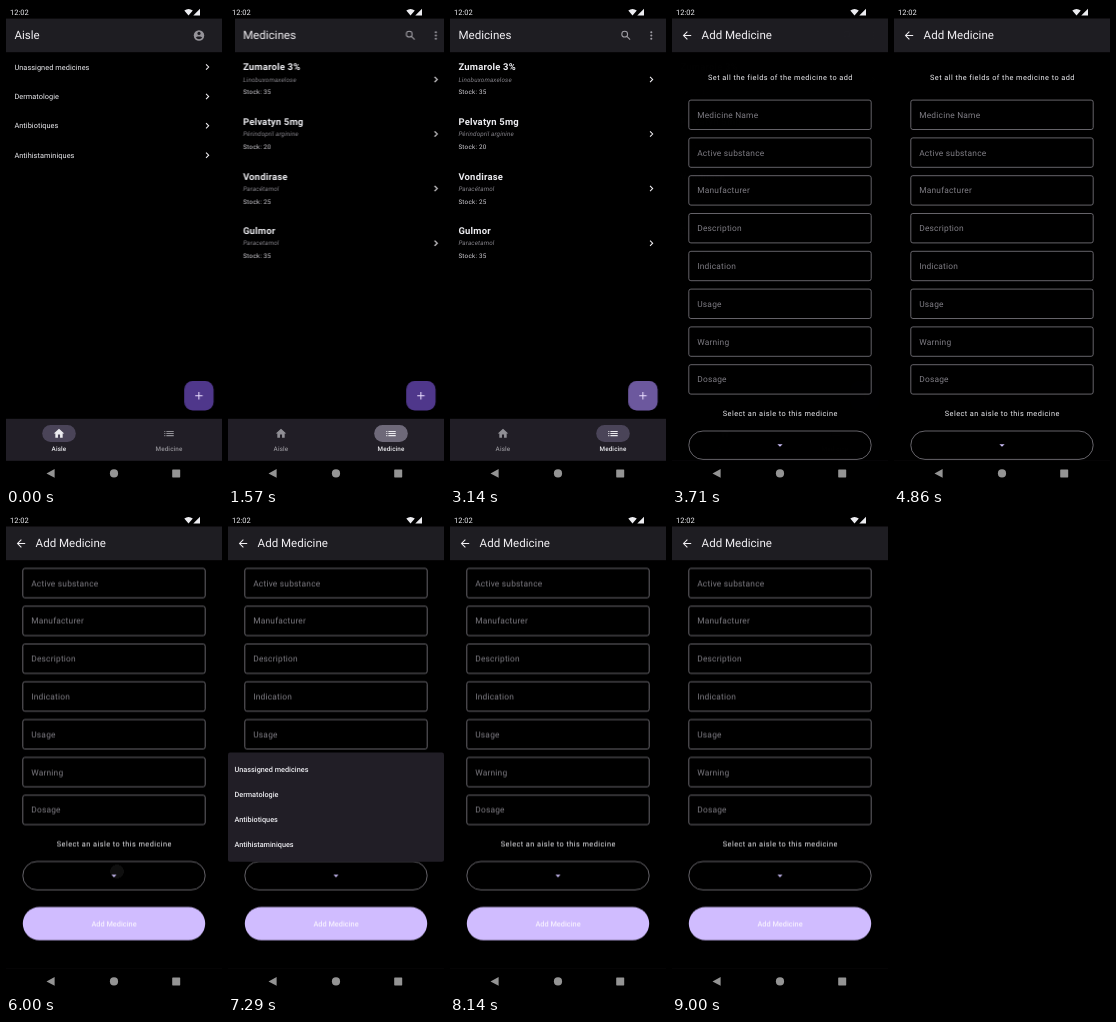
These frames come from a looping animation (216x480 px, 9140 ms). An HTML page:

```html
<!DOCTYPE html>
<html lang="en">
<head>
<meta charset="utf-8">
<title>Medicine stock app</title>
<style>
html, body { margin: 0; width: 100%; height: 100%; overflow: hidden; background: #000; }
svg { display: block; width: 100%; height: 100%; }
text { font-family: Roboto, "Open Sans", sans-serif; fill: #ececf0; white-space: pre; text-rendering: geometricPrecision; }
.title { font-size: 11.55px; fill: #f2f0f4; }
.row { font-size: 7.35px; letter-spacing: .06px; }
.name { font-size: 9.45px; font-weight: 700; letter-spacing: .22px; }
.substance { font-size: 6.3px; font-style: italic; letter-spacing: .14px; fill: #85838a; }
.stock { font-size: 6.3px; letter-spacing: .24px; fill: #d2d0d6; }
.tab text { font-size: 6.3px; font-weight: 500; letter-spacing: .15px; text-anchor: middle; }
.hint { font-size: 7.35px; letter-spacing: .44px; text-anchor: middle; }
.label { font-size: 8.4px; letter-spacing: .21px; fill: #7f7d84; }
.item { font-size: 7.3px; font-weight: 500; }
.action { font-size: 7.35px; font-weight: 500; text-anchor: middle; fill: #f8f2ff; }
.bar { fill: #1e1d22; }
.panel { fill: #211e26; }
.outline { fill: none; stroke: #716f75; stroke-width: .9; }
.pill { fill: #4a4458; }
.icon { fill: none; stroke: #a09ea5; stroke-width: 2; }
.solid { fill: #ececf0; stroke: none; }

.anim { animation: 9140ms linear infinite; transform-box: fill-box; transform-origin: center; }
.aisle-page { animation-name: aisle-page; }
.medicine-page { animation-name: medicine-page; }
.tab-off { animation-name: tab-off; }
.tab-on { animation-name: tab-on; }
.pill-off { animation-name: pill-off; }
.pill-on { animation-name: pill-on; }
.tab-ripple { animation-name: tab-ripple; }
.fab-ripple { animation-name: fab-ripple; }
.add-page { animation-name: add-page; }
.form { animation-name: scroll; }
.select-ripple { animation-name: select-ripple; }
.menu { animation-name: menu; transform-origin: 50% 100%; }

@keyframes aisle-page { 0%, 14.22% { opacity: 1 } 16.41%, 100% { opacity: 0 } }
@keyframes medicine-page {
  0%, 14.22% {
    transform: translateX(216px);
    animation-timing-function: linear(0, .264, .594, .8, .908, .96, .983, .993, 1);
  }
  18.6%, 100% { transform: none }
}
@keyframes tab-off { 0%, 14.11% { opacity: 1 } 15.21%, 100% { opacity: .55 } }
@keyframes tab-on { 0%, 14.11% { opacity: .55 } 15.21%, 100% { opacity: 1 } }
@keyframes pill-off {
  0%, 14.11% { transform: none; opacity: 1 }
  15.21%, 100% { transform: scaleX(0); opacity: 0 }
}
@keyframes pill-on {
  0%, 14.11% { transform: scaleX(0); opacity: 0 }
  15.21%, 100% { transform: none; opacity: 1 }
}
@keyframes tab-ripple {
  0%, 13.4% { opacity: 0 }
  14.4%, 17.5% { opacity: .2 }
  20.24%, 100% { opacity: 0 }
}
@keyframes fab-ripple {
  0%, 30.6% { opacity: 0 }
  32.3%, 42% { opacity: .17 }
  45%, 100% { opacity: 0 }
}
@keyframes add-page {
  0%, 34.46% { opacity: 0; animation-timing-function: cubic-bezier(.4, 0, .2, 1) }
  41.03%, 100% { opacity: 1 }
}
@keyframes scroll {
  0%, 53.28% { transform: none; animation-timing-function: cubic-bezier(.3, .2, .3, 1) }
  60.18%, 100% { transform: translateY(-77.5px) }
}
@keyframes select-ripple {
  0%, 65.48% { transform: scale(.02); opacity: 0 }
  65.49% { transform: scale(.02); opacity: .06 }
  68.38% { transform: none; opacity: .06 }
  70.02%, 100% { transform: none; opacity: 0 }
}
@keyframes menu {
  0%, 67.29% { transform: scale(.8); opacity: 0 }
  67.62% { transform: scale(.9); opacity: 1 }
  68.6%, 85.67% { transform: none; opacity: 1 }
  86.49%, 100% { transform: none; opacity: 0 }
}
</style>
</head>
<body>
<svg viewBox="0 0 216 480">
  <defs>
    <clipPath id="viewport"><rect y="47" width="216" height="407.8"/></clipPath>
    <clipPath id="select-shape"><rect x="16.8" y="425" width="182.4" height="28.4" rx="14.2"/></clipPath>
    <path id="chevron" d="M-2.2 -5 2.8 0 -2.2 5"/>
  </defs>

  <g class="anim aisle-page">
    <rect class="bar" y="12.6" width="216" height="33.6"/>
    <text class="title" x="8.5" y="33.4">Aisle</text>
    <g transform="translate(193 29.5) scale(.525)">
      <circle r="10" fill="#96949a"/>
      <circle class="bar" cy="-4" r="3"/>
      <path class="bar" d="M-6 4C-5.5 1 5.5 1 6 4 3 8.2-3 8.2-6 4z"/>
    </g>
    <g id="aisles"></g>
  </g>

  <g class="anim medicine-page">
    <rect y="12.6" width="216" height="400.2"/>
    <rect class="bar" y="12.6" width="216" height="33.6"/>
    <text class="title" x="8.5" y="33.4">Medicines</text>
    <g class="icon" transform="translate(176 29.5) scale(.525)">
      <circle cx="-2.5" cy="-2.5" r="5.5"/><path d="M1.7 1.7 7.8 7.8"/>
    </g>
    <g transform="translate(201.3 29.5)" fill="#a09ea5">
      <circle cy="-3.2" r="1.05"/><circle r="1.05"/><circle cy="3.2" r="1.05"/>
    </g>
    <g id="medicines"></g>
  </g>

  <rect class="panel" y="412.8" width="216" height="42"/>
  <rect class="pill anim pill-off" x="36.2" y="419.1" width="33.6" height="16.8" rx="8.4"/>
  <rect class="pill anim pill-on" x="146.2" y="419.1" width="33.6" height="16.8" rx="8.4"/>
  <rect class="anim tab-ripple" x="146.2" y="419.1" width="33.6" height="16.8" rx="8.4" fill="#fff"/>
  <g class="tab anim tab-off">
    <path class="solid" transform="translate(46.7 421.2) scale(.525)" d="M10 20v-6h4v6h5v-8h3L12 3 2 12h3v8z"/>
    <text x="53" y="444.5">Aisle</text>
  </g>
  <g class="tab anim tab-on">
    <path class="solid" transform="translate(156.7 421.2) scale(.525)"
      d="M3 7h2v2H3zm0 4h2v2H3zm0 4h2v2H3zM7 7h14v2H7zm0 4h14v2H7zm0 4h14v2H7z"/>
    <text x="163" y="444.5">Medicine</text>
  </g>

  <g transform="translate(178.2 375)">
    <rect width="29.4" height="29.4" rx="8.4" fill="#4f378b"/>
    <rect class="anim fab-ripple" width="29.4" height="29.4" rx="8.4" fill="#fff"/>
    <path d="M14.7 11v7.4M11 14.7h7.4" stroke="#eaddff" stroke-width="1.05"/>
  </g>

  <g class="anim add-page">
    <rect y="12.6" width="216" height="442.2"/>
    <rect class="bar" y="12.6" width="216" height="33.6"/>
    <path class="icon" style="stroke:#f2f0f4" transform="translate(15 29.5) scale(.525)" d="M8 0H-6.5M.7-7.3-6.6 0 .7 7.3"/>
    <text class="title" x="29.6" y="33.4">Add Medicine</text>
    <g clip-path="url(#viewport)">
      <g class="anim form">
        <text class="hint" x="108.5" y="73.8">Set all the fields of the medicine to add</text>
        <g id="fields"></g>
        <text class="hint" x="108.3" y="409.8">Select an aisle to this medicine</text>
        <g clip-path="url(#select-shape)">
          <circle class="anim select-ripple" cx="111" cy="435" r="90" fill="#fff"/>
        </g>
        <rect class="outline" x="16.8" y="425" width="182.4" height="28.4" rx="14.2"/>
        <path d="M105.4 438.2h5.2l-2.6 2.6z" fill="#cdbffa"/>
        <rect x="16.8" y="470.4" width="182.4" height="33.4" rx="16.7" fill="#d0bcff"/>
        <text class="action" x="108" y="489.7">Add Medicine</text>
      </g>
    </g>
    <g class="anim menu">
      <rect class="panel" y="238.6" width="216" height="109.2" rx="2.1"/>
      <g id="options"></g>
    </g>
  </g>

  <text x="4" y="9.4" style="font-size:7.5px">12:02</text>
  <path class="solid" d="M178.3 4.6Q182.5 1.6 186.8 4.6L182.5 9.4zM194 2.8V9.4H187.3z"/>
  <g fill="#949494">
    <path d="M40.5 467.4 48.6 463V471.8z"/>
    <circle cx="108" cy="467.4" r="4.1"/>
    <rect x="166.2" y="463.4" width="8" height="8" rx=".6"/>
  </g>
</svg>
<script>
const aisles = ["Unassigned medicines", "Dermatologie", "Antibiotiques", "Antihistaminiques"];
const medicines = [
  ["Zumarole 3%", "Linobuxomaxelose", 35],
  ["Pelvatyn 5mg", "Périndopril arginine", 20],
  ["Vondirase", "Paracétamol", 25],
  ["Gulmor", "Paracetamol", 35]
];
const fields = ["Medicine Name", "Active substance", "Manufacturer", "Description",
  "Indication", "Usage", "Warning", "Dosage"];

const text = (style, x, y, value) => `<text class="${style}" x="${x}" y="${y}">${value}</text>`;
const chevron = y => `<use href="#chevron" class="icon" style="stroke:#f2f0f4" transform="translate(201.2 ${y}) scale(.525)"/>`;
const fill = (id, list, top, pitch, draw) => {
  document.getElementById(id).innerHTML = list.map((entry, i) => draw(entry, top + pitch * i)).join("");
};

fill("aisles", aisles, 61, 29.4, (name, y) => text("row", 8.4, y + 2.6, name) + chevron(y));
fill("medicines", medicines, 73.4, 54.6, ([name, substance, stock], y) =>
  text("name", 8.4, y - 9.1, name) + text("substance", 8.4, y + 2.2, substance) +
  text("stock", 8.4, y + 15, "Stock: " + stock) + chevron(y));
fill("fields", fields, 94.1, 37.8, (label, y) =>
  `<rect class="outline" x="16.8" y="${y}" width="182.4" height="29.4" rx="2.1"/>` +
  text("label", 25.2, y + 17.6, label));
fill("options", aisles, 257.8, 25.2, (name, y) => text("item", 6.5, y, name));
</script>
</body>
</html>
```
